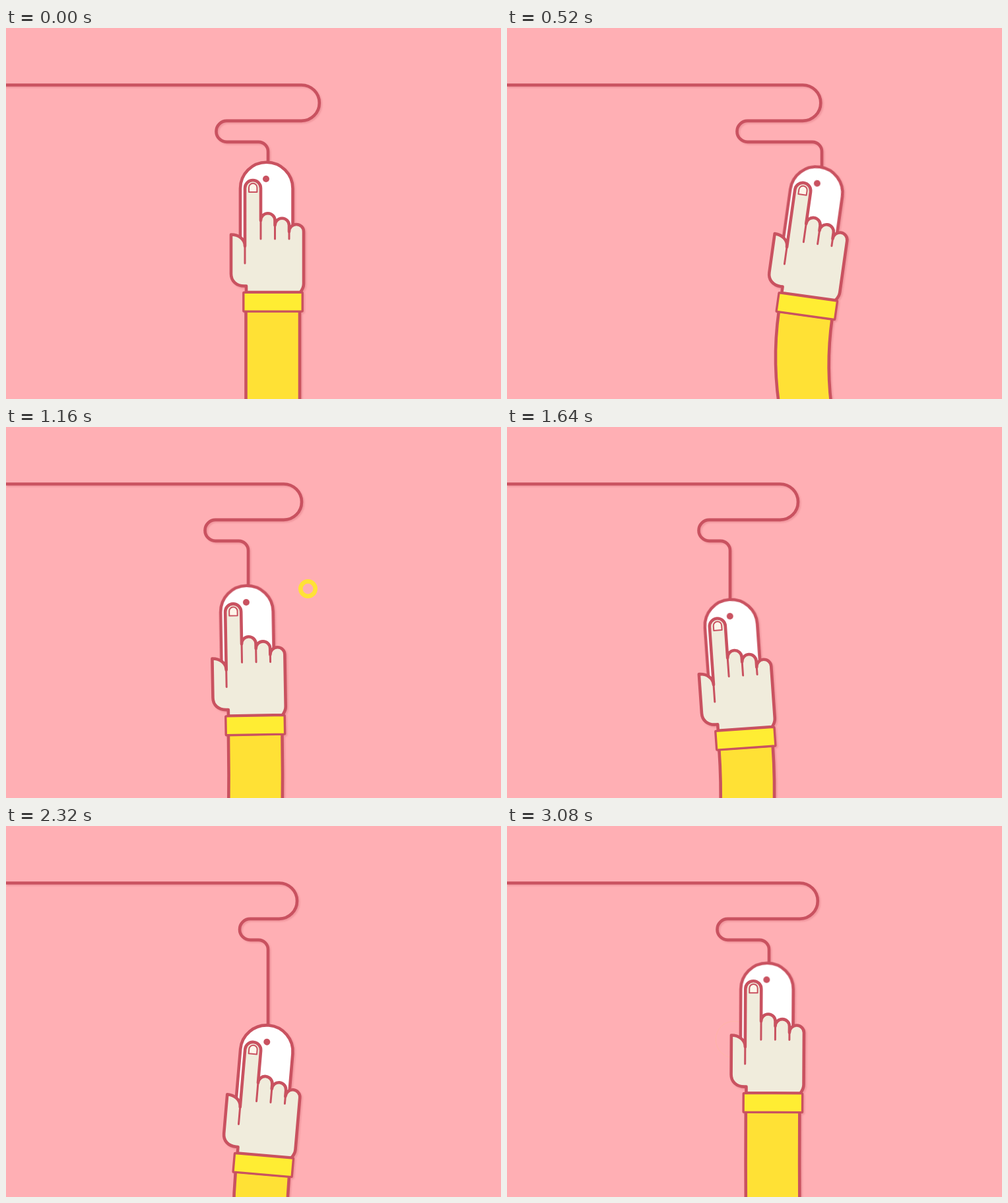
Write an HTML page that moves like this. It is 750 px wide and 563 px high and loops after 3120 ms.

```html
<!DOCTYPE html>
<html lang="en">
<head>
<meta charset="utf-8">
<title>Mouse hand</title>
<style>
  html, body { margin: 0; width: 100%; height: 100%; overflow: hidden; background: #ffafb4; }
  svg { display: block; width: 100vw; height: 100vh; }
  .ink { stroke: #c95260; stroke-width: 4.6; stroke-linejoin: round; fill: none; }
  .shade { filter: drop-shadow(2px 2px 1px rgba(201, 82, 96, .28)); }
  .skin { fill: #f0ecdc; }
  .fine { stroke-width: 3; stroke-linecap: round; }
</style>
</head>
<body>
<svg viewBox="0 0 750 563">
  <g id="rings" fill="none" stroke="#ffe236"></g>
  <g class="shade">
    <path id="cord" class="ink"/>
    <g class="body">
      <path class="ink" style="fill:#fff" d="M355 330V243.5a39.75 39.75 0 0 1 79.5 0V330"/>
      <circle cx="394" cy="229" r="5" fill="#c95260"/>
    </g>
    <path id="arm" class="ink" style="fill:#ffe135"/>
    <g class="body">
      <path class="ink skin" d="M364 401V391.5H361C349 391.5 341 384 341 373V313.5C352 313.5 362 320 362 331V243
        a12 12 0 0 1 24 0V292a10.75 10.75 0 0 1 21.5 0V299.5a10.75 10.75 0 0 1 21.5 0V309a11 11 0 0 1 22 0
        V388c0 6-2 9-5 13Z"/>
      <path class="ink fine" d="M386 290V320M407.5 300V320M429 309V320M362 325V357"/>
      <path class="ink" style="fill:#fdf6ea;stroke-width:2" d="M368 249V242a6.2 6.2 0 0 1 12.4 0V249Z"/>
      <rect class="ink" style="fill:#ffed33;stroke-width:3.4" x="359.8" y="401.3" width="89.4" height="28.8" rx="1"/>
    </g>
  </g>
</svg>
<script>
const LOOP = 3120, PIVOT = [397, 203], RAD = Math.PI / 180;

// time, pivot x, pivot y, tilt, cord x, cord right bend, cord left bend
const POSES = [
  [0, 397, 203, 0, 397, 474.8, 318.5],
  [520, 476.5, 210.5, 8, 477, 475.3, 348.5],
  [640, 479, 214, 8, 479.5, 474.5, 350],
  [1160, 366.5, 240, -1, 367, 448, 301.5],
  [1640, 339, 261, -4, 338, 441, 290.5],
  [2320, 400.5, 302, 4.9, 397, 441, 354],
  [2760, 396.5, 240, 1, 398, 441, 343.5],
  [3080, 396.5, 207.3, .3, 397, 470.8, 318.5],
];
const CLICKS = [[1044, 457.5, 245.5], [2734, 344, 324]];

const $ = id => document.getElementById(id);
const bodies = document.querySelectorAll('.body');
const rings = CLICKS.map(([, x, y]) => {
  const c = document.createElementNS('http://www.w3.org/2000/svg', 'circle');
  c.setAttribute('cx', x);
  c.setAttribute('cy', y);
  return $('rings').appendChild(c);
});

function key(i) {
  const n = POSES.length, turn = Math.floor(i / n);
  const [t, ...v] = POSES[i - turn * n];
  return [t + turn * LOOP, ...v];
}

const slope = (a, b, j) => (b[j] - a[j]) / (b[0] - a[0]);

// Tangent at b, weighted towards the nearer neighbour; flat stretches stay flat.
function tangent(a, b, c, j) {
  const before = slope(a, b, j), after = slope(b, c, j);
  if (!before || !after) return 0;
  return (before * (c[0] - b[0]) + after * (b[0] - a[0])) / (c[0] - a[0]);
}

function poseAt(t) {
  let i = POSES.length - 1;
  while (POSES[i][0] > t) i--;
  const [a, b, c, d] = [i - 1, i, i + 1, i + 2].map(key);
  const h = c[0] - b[0], u = (t - b[0]) / h, w = 1 - u;
  return [1, 2, 3, 4, 5, 6].map(j =>
    b[j] * w * w * (1 + 2 * u) + c[j] * u * u * (3 - 2 * u) +
    h * u * w * (w * tangent(a, b, c, j) - u * tangent(b, c, d, j)));
}

function cordPath(x, y, right, left) {
  return `M-5 86.5H${right - 27.2}a27.2 27.2 0 0 1 0 54.4H${left + 16}` +
    `a16 16 0 0 0 0 32H${x - 14.5}a14.5 14.5 0 0 1 14.5 14.5V${y + 4}`;
}

function armPath(x, y, tilt) {
  const a = tilt * RAD, cos = Math.cos(a), sin = Math.sin(a);
  const edge = dx => {
    const px = x + dx * cos - 226 * sin, py = y + dx * sin + 226 * cos;
    const s = 590 - py, lean = Math.tan(a) * s;
    return {
      start: `${px} ${py}`,
      mid: `${px - lean / 2} ${py + s / 2}`,
      end: `${px - lean + tilt * s * s / 8000} 590`,
    };
  };
  const l = edge(-33.5), r = edge(48);
  return `M${l.start}Q${l.mid} ${l.end}L${r.end}Q${r.mid} ${r.start}Z`;
}

const grow = p => 28 * (1 - (1 - Math.max(0, p)) ** 2);

function drawRing(ring, p) {
  const on = p > 0 && p < 1;
  const outer = on ? grow(p) : 0, inner = on ? grow((p - .18) / .82) : 0;
  ring.setAttribute('r', (outer + inner) / 2);
  ring.setAttribute('stroke-width', outer - inner);
}

function draw(t) {
  const [x, y, tilt, cordX, right, left] = poseAt(t);
  const move = `translate(${x} ${y}) rotate(${tilt}) translate(${-PIVOT[0]} ${-PIVOT[1]})`;
  bodies.forEach(b => b.setAttribute('transform', move));
  $('cord').setAttribute('d', cordPath(cordX, y, right, left));
  $('arm').setAttribute('d', armPath(x, y, tilt));
  rings.forEach((ring, i) => drawRing(ring, (t - CLICKS[i][0]) / 380));
}

let start;
function tick(now) {
  start ??= now;
  draw((now - start) % LOOP);
  requestAnimationFrame(tick);
}
draw(0);
requestAnimationFrame(tick);
</script>
</body>
</html>
```
